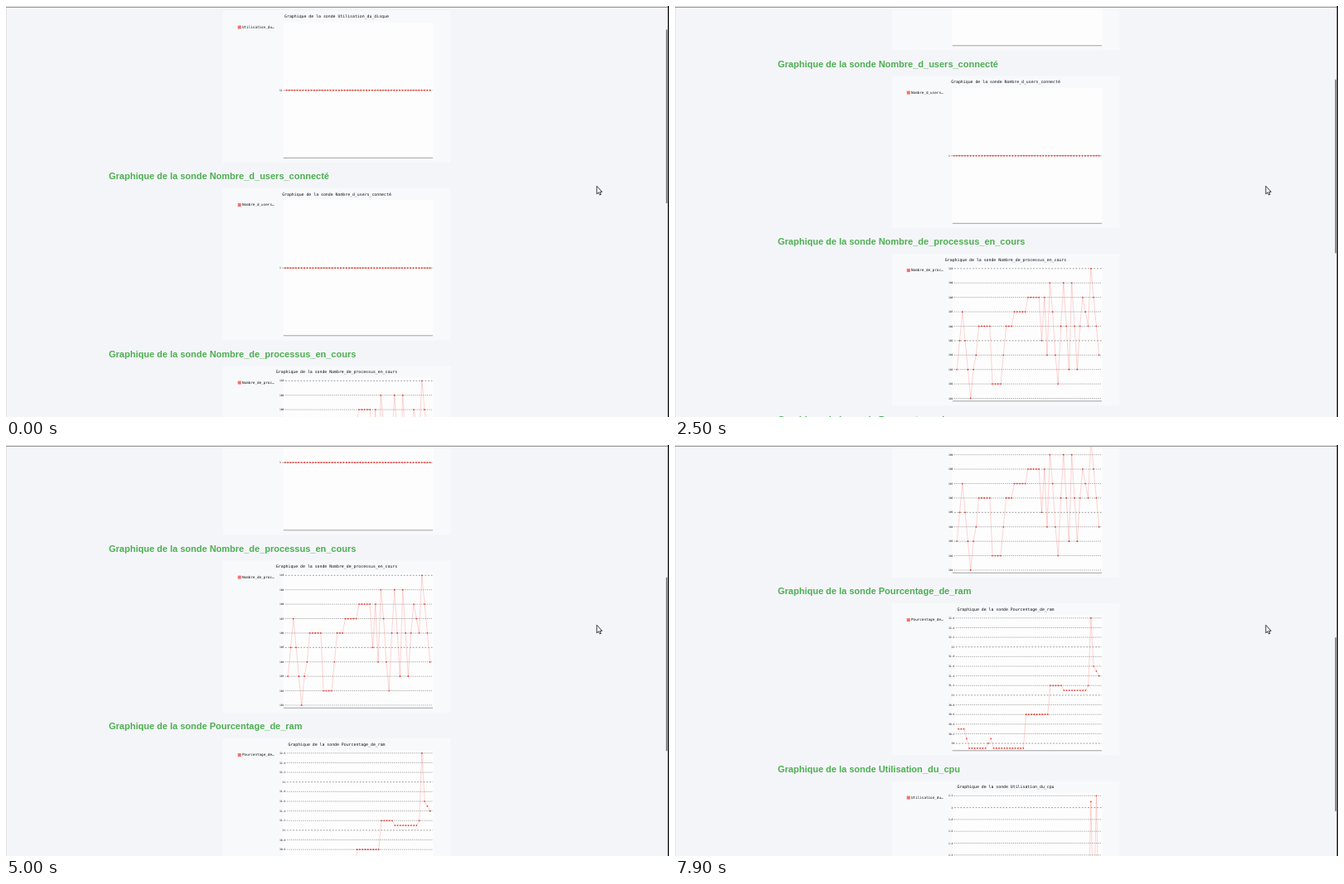
Recreate the animation shown at these times as an HTML page. Size 800x496 px, loop 8000 ms.

```html
<!DOCTYPE html>
<html lang="fr">
<head>
<meta charset="utf-8">
<title>Graphiques des sondes</title>
<style>
  html, body { margin: 0; width: 100%; height: 100%; overflow: hidden; background: #f4f5f9; }
  svg { position: absolute; left: 0; top: 0; display: block; }
  .head { font: bold 11px "Liberation Sans", Arial, sans-serif; fill: #4caf50; }
  .mono { font-family: "DejaVu Sans Mono", "Liberation Mono", monospace; fill: #111; }
  .title { font-size: 4.87px; text-anchor: middle; }
  .legend { font-size: 4.27px; }
  .label { font-size: 3.05px; text-anchor: end; }
  .guide { stroke: rgba(0, 0, 0, .6); stroke-width: .6; stroke-dasharray: 1.22; }
  .major { stroke: rgba(0, 0, 0, .65); stroke-width: .6; stroke-dasharray: 1.83; }
  .axis { stroke: #98989b; stroke-width: .9; }
  .serie { fill: none; stroke: #f44336; stroke-opacity: .45; stroke-width: .5; }
  .dot { fill: #e53a31; }
</style>
</head>
<body>
<svg width="800" height="496" viewBox="0 0 800 496">
  <g id="page"></g>
  <rect width="800" height="1" fill="#eeeef0"/>
  <rect y="1" width="800" height="1" fill="#929294"/>
  <rect width=".6" y="2" height="494" fill="#d9dadd"/>
  <rect id="thumb" x="796.5" width="1.5" height="209.5" fill="#737476"/>
  <rect x="798.6" width="1.4" height="496" fill="#111"/>
  <path d="M712.9 217.3v9.6l2.1-1.9 1.5 3 1.5-.7-1.4-3h2.7z" fill="#fff" stroke="#222" stroke-width=".9" stroke-linejoin="round"/>
</svg>
<script>
const NS = "http://www.w3.org/2000/svg";
const page = document.getElementById("page");
const thumb = document.getElementById("thumb");

function add(parent, tag, attrs, text) {
  const el = document.createElementNS(NS, tag);
  for (const key in attrs) el.setAttribute(key, attrs[key]);
  if (text) el.textContent = text;
  return parent.appendChild(el);
}

const SAMPLES = 53;
const snap = (v, unit) => Math.round(v / unit) * unit;
const tidy = v => String(Math.round(v * 10) / 10);

// Value at sample i on the straight lines between [sample, value] keys
function valueAt(keys, i) {
  const n = keys.findIndex(([at]) => at >= i);
  if (n < 1) return keys[Math.max(n, 0)][1];
  const [a, from] = keys[n - 1], [b, to] = keys[n];
  return from + (to - from) * (i - a) / (b - a);
}

// top: value of the first guide; step and gap: value and pixels between guides;
// unit: precision of the samples; major: every such value gets a long-dash guide
const flat = value => ({
  keys: [[0, value], [SAMPLES - 1, value]],
  top: value, step: 1, gap: 0, guides: 1, first: 111.2, unit: 1, major: 1
});
const charts = [
  { name: "Utilisation_du_disque", ...flat(51) },
  { name: "Nombre_d_users_connecté", ...flat(1) },
  {
    name: "Nombre_de_processus_en_cours",
    keys: [[0, 103], [2, 107], [5, 101], [8, 106], [12, 106], [13, 102], [16, 102], [18, 106],
      [28, 108], [30, 108], [31, 105], [32, 108], [33, 104], [34, 109], [37, 102], [39, 109],
      [41, 103], [42, 109], [44, 103], [46, 108], [48, 106], [49, 110], [52, 104]],
    top: 110, step: 1, gap: 17.41, guides: 10, first: 32.8, unit: 1, major: 5
  },
  {
    name: "Pourcentage_de_ram",
    keys: [[0, 30.3], [2, 30.3], [4, 29.9], [10, 29.9], [12, 30.1], [13, 29.9], [24, 29.9],
      [25, 30.6], [33, 30.6], [34, 31.2], [38, 31.2], [39, 31.1], [46, 31.1], [48, 31.2],
      [49, 32.6], [50, 31.6], [52, 31.4]],
    top: 32.6, step: .2, gap: 11.64, guides: 14, first: 32.8, unit: .1, major: 1
  },
  {
    name: "Utilisation_du_cpu",
    keys: [[0, 0], [48, 0], [49, 2.1], [50, 0], [51, 2.2], [52, 0]],
    top: 2.2, step: .2, gap: 14.3, guides: 12, first: 32.8, unit: .1, major: 1
  }
];

function drawChart(c, index) {
  const g = add(page, "g", { transform: `translate(0 ${-9.5 + 214.5 * index})` });
  const yOf = v => c.first + (c.top - v) / c.step * c.gap;
  const heading = "Graphique de la sonde " + c.name;

  add(g, "text", { class: "head", x: 124, y: 4 }, heading);
  add(g, "rect", { x: 261.5, y: 15, width: 275, height: 183.3, fill: "#f8f9fb" });
  add(g, "rect", { x: 334.3, y: 29.6, width: 181, height: 163.2, fill: "#fefdfe" });
  add(g, "text", { class: "mono title", x: 399, y: 23.9 }, heading);
  add(g, "rect", { x: 279.7, y: 33.1, width: 4, height: 4, fill: "#f66f66" });
  add(g, "text", { class: "mono legend", x: 285, y: 36.4 }, c.name.slice(0, 14) + "…");

  // The plot starts right of its widest label
  const left = 331.5 + 1.84 * tidy(c.top).length;
  for (let k = 0; k < c.guides; k++) {
    const v = c.top - k * c.step, y = yOf(v);
    const isMajor = Math.abs(v - snap(v, c.major)) < .01;
    add(g, "line", { class: isMajor ? "major" : "guide", x1: left, x2: 515, y1: y, y2: y });
    add(g, "text", { class: "mono label", x: left - 1.6, y: y + 1.1 }, tidy(v));
  }
  add(g, "line", { class: "axis", x1: 334.8, x2: 515, y1: 192.8, y2: 192.8 });

  const start = left + 3.2, dx = (511.7 - start) / (SAMPLES - 1);
  const points = Array.from({ length: SAMPLES }, (_, i) =>
    [start + i * dx, yOf(snap(valueAt(c.keys, i), c.unit))]);
  add(g, "polyline", { class: "serie", points: points.join(" ") });
  for (const [cx, cy] of points) add(g, "circle", { class: "dot", cx, cy, r: .87 });
}
charts.forEach(drawChart);

// Each wheel notch moves the page in four hard steps, 100 ms apart
const LOOP = 8000;
const notchSteps = [.5, 30.5, 58, 64.5];
const notchStarts = [-200, 900, 1800, 2700, 4000, 4900, 5900, 7100];

function scrollAt(t) {
  let y = -58;
  for (const start of notchStarts) {
    if (t >= start) y += notchSteps[Math.min(3, Math.floor((t - start) / 100))];
  }
  return y;
}

const origin = performance.now();
function draw(now) {
  const y = scrollAt(Math.max(0, now - origin) % LOOP);
  page.setAttribute("transform", `translate(0 ${-y})`);
  thumb.setAttribute("y", 28.5 + .445 * y);
  requestAnimationFrame(draw);
}
draw(origin);
</script>
</body>
</html>
```
